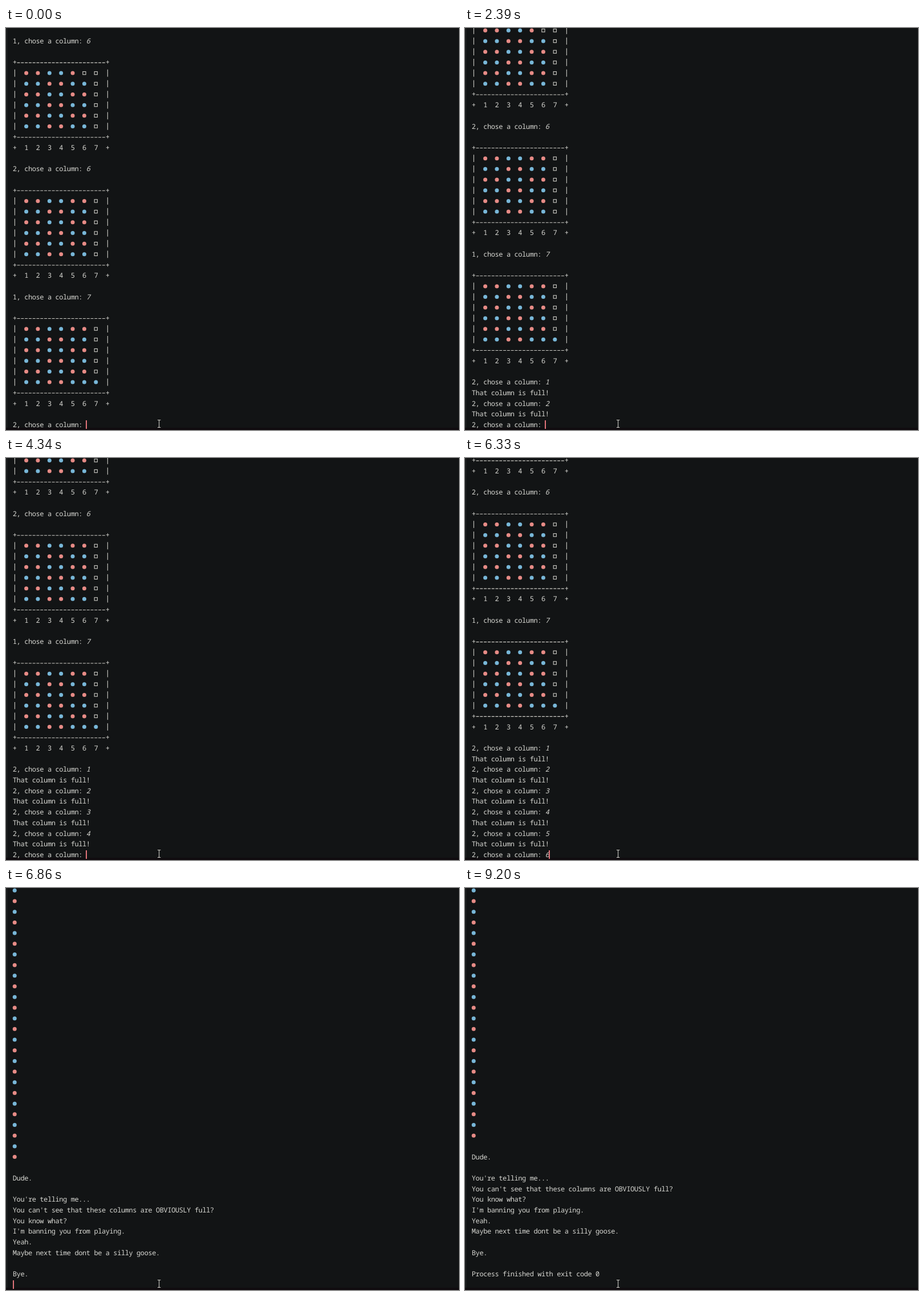
An HTML page for the animation above (9.54 s loop, 795 by 705 pixels).

```html
<!DOCTYPE html>
<html lang="en">
<head>
<meta charset="utf-8">
<title>Console game</title>
<style>
  html, body { margin: 0; width: 100%; height: 100%; overflow: hidden; background: #121415; }
  svg { display: block; width: 795px; height: 705px; }
  text {
    font: 12px "Noto Sans Mono", "DejaVu Sans Mono", monospace;
    letter-spacing: calc(6.79px - .6em);
    text-rendering: geometricPrecision;
    white-space: pre;
    fill: #d8d8d3;
  }
  .typed { font-style: italic; }
  .red { fill: #e78b86; }
  .blue { fill: #78b7d8; }
  .line { fill: none; stroke: #cdccc6; stroke-width: 1.1; }
  #caret { fill: #e2747b; }
</style>
</head>
<body>
<svg viewBox="0 0 795 705">
  <rect width="3" height="705" fill="#191b1c"/>
  <rect y="701" width="795" height="4" fill="#100c0f"/>
  <g id="log"></g>
  <rect id="caret" y="688" width="2" height="15"/>
  <path class="line" d="M266 687.5h2l.7 .7 .7-.7h2M268.7 688v12M266 700.5h2l.7-.7 .7 .7h2"/>
</svg>
<script>
const LOOP = 9540, CELL = 6.79, LEFT = 11.8, TOP = 4.35, PITCH = 18.69, LAST_ROW = 37;
const PROMPT = 'chose a column: ', INPUT_COL = PROMPT.length + 3;
const mid = col => LEFT + (col + .5) * CELL;

const text = (s, col = 0) => `<text x="${LEFT + col * CELL}" y="4">${s}</text>`;
const dot = (col, color) => `<circle class="${color}" cx="${mid(col)}" r="3.5"/>`;
const box = col => `<rect class="line" x="${mid(col) - 2.6}" y="-2.6" width="5.2" height="5.2"/>`;
const bar = col => `<path class="line" d="M${mid(col) + .2}-6.3V6.3"/>`;
const prompt = (player, n) => text(`${player}, ${PROMPT}<tspan class="typed">${n}</tspan>`);
const border = text('+') + text('+', 24) +
  `<path class="line" stroke-dasharray="5 ${CELL - 5}" d="M${LEFT + CELL + .9} .5H${LEFT + 24 * CELL}"/>`;

// Discs alternate in pairs of columns; state(r, c) may override a cell.
function board(state) {
  const rows = [];
  for (let r = 0; r < 6; r++) {
    let row = bar(0) + bar(24);
    for (let c = 0; c < 7; c++) {
      const color = state(r, c) ?? ((r + (c >> 1)) % 2 ? 'blue' : 'red');
      row += color ? dot(3 + 3 * c, color) : box(3 + 3 * c);
    }
    rows.push(row);
  }
  return ['', border, ...rows, border, text('+  1  2  3  4  5  6  7  +'), ''];
}

const lines = [
  '', prompt(1, 6), ...board((r, c) => c === 6 || (c === 5 && r === 0) ? '' : null),
  prompt(2, 6), ...board((r, c) => c === 6 ? '' : null),
  prompt(1, 7), ...board((r, c) => c === 6 ? (r === 5 ? 'blue' : '') : null)
];

// Each try types a digit, then confirms it; both are moments in ms.
const tries = [[1260, 1460], [2260, 2390], [3220, 3350], [3870, 4340], [4940, 5280], [6330, 6600]];
const steps = [];
const addStep = (time, cursor, col) => steps.push({ time, cursor, col });

addStep(-500, lines.length, INPUT_COL);
tries.forEach(([typed, entered], i) => {
  addStep(typed, lines.length, INPUT_COL + 1);
  lines.push(prompt(2, i + 1), text('That column is full!'));
  addStep(entered, lines.length, i < 5 ? INPUT_COL : 0);
});

const firstDot = lines.length;
for (let i = 0; i < 42; i++) lines.push(dot(0, i % 2 ? 'red' : 'blue'));
addStep(6660, firstDot + 15, 0);
addStep(6800, firstDot + 28, 0);

const print = (time, ...words) => {
  lines.push(...words.map(s => text(s)));
  addStep(time, lines.length, 0);
};
print(6860, '', 'Dude.', '', "You're telling me...",
  "You can't see that these columns are OBVIOUSLY full?",
  'You know what?', "I'm banning you from playing.", 'Yeah.',
  'Maybe next time dont be a silly goose.', '', 'Bye.');
print(7270, '', 'Process finished with exit code 0');

const log = document.getElementById('log');
const caret = document.getElementById('caret');
log.innerHTML = lines.map(s => `<g>${s}</g>`).join('');
const groups = [...log.children];

function show({ cursor, col }) {
  groups.forEach((g, i) => {
    const row = i - cursor + LAST_ROW;
    const visible = row >= 0 && (i < cursor || (i === cursor && col > 0));
    g.style.display = visible ? '' : 'none';
    g.setAttribute('transform', `translate(0 ${TOP + row * PITCH})`);
    const typed = g.querySelector('.typed');
    if (typed) typed.style.display = i === cursor && col === INPUT_COL ? 'none' : '';
  });
  caret.setAttribute('x', Math.floor(12 + col * 6.78));
}

let current;
function tick() {
  const t = performance.now() % LOOP;
  const step = steps.findLast(s => s.time <= t);
  if (step !== current) show(current = step);
  // The blink runs freely but stays lit for a while after any activity.
  const dark = (t + 940) % 1010 < 520 && t - step.time >= 500;
  caret.style.display = dark ? 'none' : '';
  requestAnimationFrame(tick);
}
tick();
</script>
</body>
</html>
```
